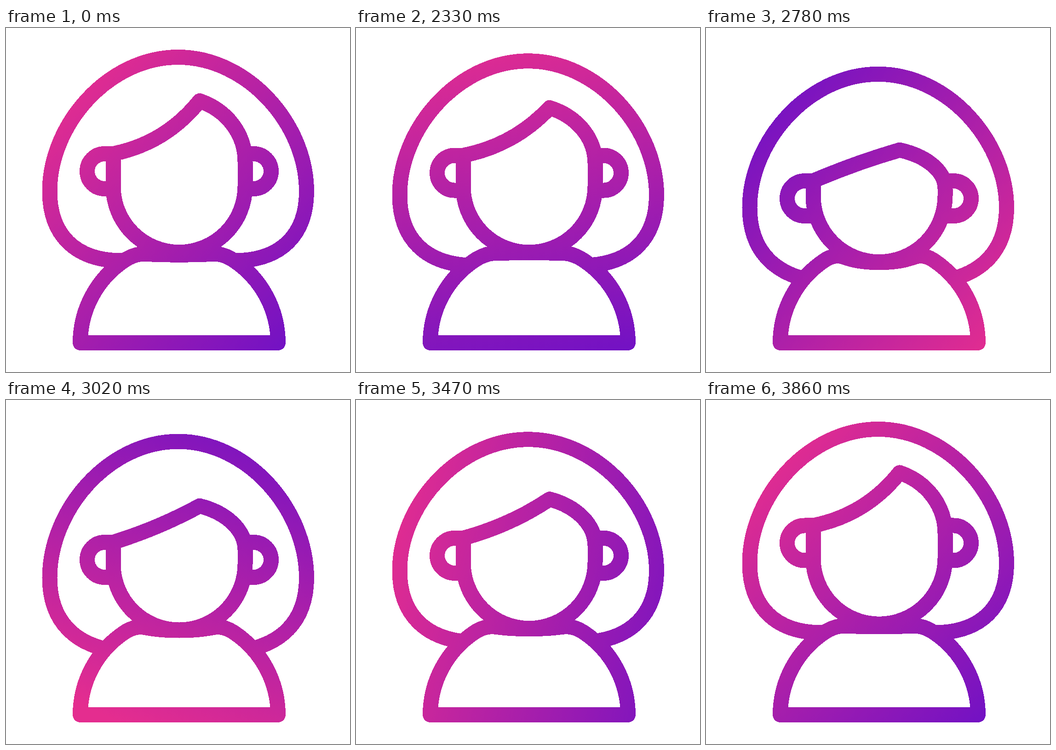
Animation, 748 px wide and 748 px high, one loop 3890 ms. Source, as an HTML page:

```html
<!DOCTYPE html>
<html lang="en">
<head>
<meta charset="utf-8">
<title>Avatar</title>
<style>
  html, body { margin: 0; width: 100%; height: 100%; overflow: hidden; background: #fff; }
  svg { display: block; width: 100vw; height: 100vh; }
  path {
    fill: none; stroke: url(#ink); stroke-width: 33;
    stroke-linejoin: round; shape-rendering: crispEdges;
  }
  #body { fill: #fff; }
</style>
</head>
<body>
<svg viewBox="0 0 748 748">
  <defs>
    <linearGradient id="ink" gradientUnits="userSpaceOnUse">
      <stop offset="0" stop-color="#e42d8f"/>
      <stop offset="1" stop-color="#7011c5"/>
    </linearGradient>
  </defs>
  <path id="hair"/>
  <path id="body"/>
  <path id="ears"/>
  <path id="face"/>
</svg>
<script>
const LOOP = 3890, START = 2030, STEP = 30;

// [time, value]: how far the head is squashed, and how far the hair has sunk
const SQUASH = [[2030, 0], [2330, 0.143], [2580, 1], [3020, 0.57], [3470, 0.46], [3660, 0]];
const SINK = [[2030, 0], [2330, 8], [2700, 36], [3470, 16], [3660, 0]];

const $ = id => document.getElementById(id);
const clamp = x => Math.max(0, Math.min(1, x));

// Smooth curve through the keys that never overshoots them
function follow(keys, t) {
  const last = keys.length - 1;
  if (t <= keys[0][0]) return keys[0][1];
  if (t >= keys[last][0]) return keys[last][1];
  const slope = i => (keys[i + 1][1] - keys[i][1]) / (keys[i + 1][0] - keys[i][0]);
  const tangent = i => {
    if (i === 0 || i === last) return 0;
    const a = slope(i - 1), b = slope(i);
    return a * b <= 0 ? 0 : 2 * a * b / (a + b);
  };
  const i = keys.findIndex(key => key[0] > t) - 1;
  const [t0, from] = keys[i], [t1, to] = keys[i + 1];
  const u = (t - t0) / (t1 - t0), v = 1 - u;
  return v * v * (1 + 2 * u) * from + u * u * (3 - 2 * u) * to
    + (t1 - t0) * u * v * (v * tangent(i) - u * tangent(i + 1));
}

function hairPath(top, sink) {
  const side = 355 + sink, low = 506 + sink, end = 506 + sink * 1.3;
  const half = x => `M374.25 ${top}C${x(223)} ${top} ${x(95)} ${top + (side - top) * 0.5} ${x(95)} ${side}`
    + `C${x(95)} ${side + 94} ${x(150)} ${low} ${x(252)} ${end}`;
  return half(x => x) + half(x => 748.5 - x);
}

function bodyPath(mid) {
  const edge = 486.5 + 1.87 * Math.sqrt(Math.max(0, mid - 486.5));
  const px = 258.5, py = 504.8, reach = (py - edge) / 0.656;
  const corner = px + reach, ex = px + 2 * reach, m = x => 753 - x;
  return `M161.5 684.5A215 215 0 0 1 ${px} ${py}Q${corner} ${edge} ${ex} ${edge}`
    + `C${ex + 15} ${edge} 316 ${mid} 376.5 ${mid}`
    + `C437 ${mid} ${m(ex + 15)} ${edge} ${m(ex)} ${edge}`
    + `Q${m(corner)} ${edge} ${m(px)} ${py}A215 215 0 0 1 591.5 684.5Z`;
}

function earsPath(y) {
  const ear = (x, end, sweep) => `M${end} ${y - 38}H${x}A38 38 0 0 ${sweep} ${x} ${y + 38}H${end}`;
  return ear(214.5, 236, 0) + ear(538.5, 517, 1);
}

function facePath(tip, ear, chin) {
  const left = ear - 38, jaw = chin - 143.5, right = Math.min(ear - 21, jaw);
  const fall = tip - 158.5, h = right - tip;
  const cx = 347 - fall * 0.2;
  const cy = left + (tip - left) * (cx - 233) / 188 + 47 - fall * 0.5;
  return `M233 ${left}Q${cx} ${cy} 421 ${tip}`
    + `C478 ${tip + h * 0.147} 520 ${tip + h * 0.53} 520 ${right}V${jaw}`
    + `A143.5 143.5 0 0 1 233 ${jaw}Z`;
}

// One full turn, fastest in the middle
function turnInk(progress) {
  const w = progress + 0.1 * Math.sin(Math.PI * progress) ** 2;
  const a = Math.PI / 4 + 2 * Math.PI * w * w * (3 - 2 * w);
  const dx = 380 * Math.cos(a), dy = 380 * Math.sin(a);
  const ends = { x1: 425 - dx, y1: 365 - dy, x2: 425 + dx, y2: 365 + dy };
  for (const key in ends) $('ink').setAttribute(key, ends[key]);
}

function draw(time) {
  const moving = time >= START;
  const t = moving ? START + Math.floor((time - START) / STEP) * STEP : LOOP;
  const squash = follow(SQUASH, t), press = squash ** 1.2;
  const dip = 4 * clamp((t - 3660) / (LOOP - 3660));

  const tip = 154.5 + 133 * squash + dip;
  const ear = 307.5 + 78.5 * press + dip;
  const chin = 485 + 29.5 * press + dip * 0.65;
  const collar = chin + 1 + 3.5 * clamp(1 - 7 * squash) + dip * 0.25;

  $('hair').setAttribute('d', hairPath(63.5 + 43 * squash ** 0.85, follow(SINK, t)));
  $('body').setAttribute('d', bodyPath(collar));
  $('ears').setAttribute('d', earsPath(ear));
  $('face').setAttribute('d', facePath(tip, ear, chin));
  turnInk((t - START) / (LOOP - START));
}

const begin = performance.now();
function tick() {
  draw((performance.now() - begin) % LOOP);
  requestAnimationFrame(tick);
}
tick();
</script>
</body>
</html>
```
